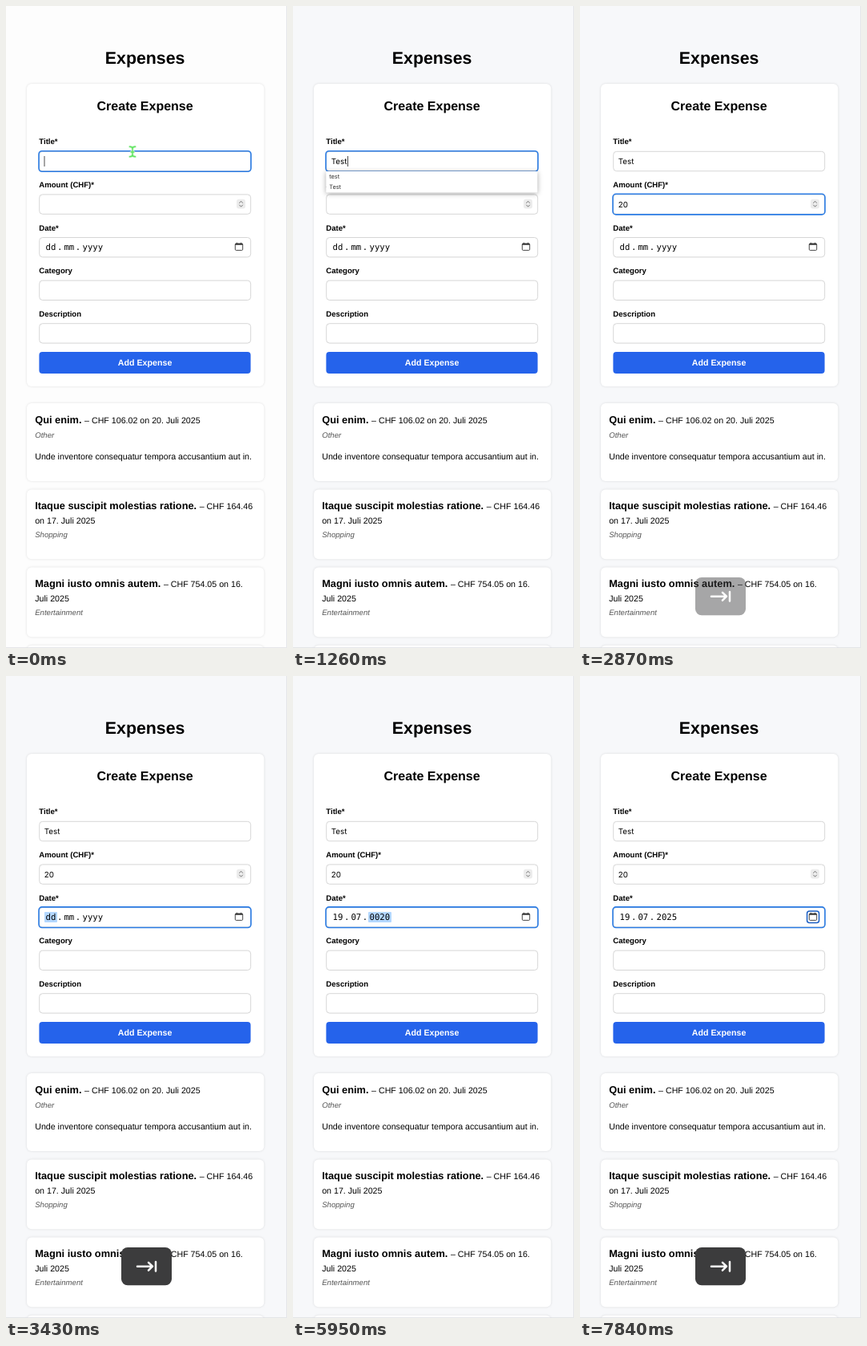
An HTML page for the animation above (8000 ms loop, 351 by 800 pixels).

```html
<!DOCTYPE html>
<html lang="en">
<head>
<meta charset="utf-8">
<title>Expenses</title>
<style>
  html, body { margin: 0; width: 100%; height: 100%; overflow: hidden; background: #f7f8fa; }
  svg { display: block; width: 100%; height: 100%; }
  text {
    font-family: "Liberation Sans", Arial, sans-serif; font-size: 10.67px; fill: #000;
    white-space: pre; text-rendering: geometricPrecision;
  }
  .h1 { font-size: 21.33px; font-weight: bold; text-anchor: middle; }
  .h2 { font-size: 16px; font-weight: bold; text-anchor: middle; }
  .label { font-size: 9.6px; font-weight: bold; }
  .name { font-size: 12.8px; font-weight: bold; }
  .tag { font-size: 9.6px; font-style: italic; fill: #555; }
  .btn { font-weight: bold; fill: #fff; text-anchor: middle; }
  .val { font-family: Inter, sans-serif; font-size: 9.8px; }
  .opt { font-family: Inter, sans-serif; font-size: 7.4px; fill: #333; }
  .mono { font-family: "DejaVu Sans Mono", monospace; }
  .card { fill: #fff; filter: drop-shadow(0 .8px 1.4px rgba(0, 0, 0, .12)); }
  .box { fill: #fff; stroke: #ccc; stroke-width: .8; }
  .menu { fill: #fff; filter: drop-shadow(0 1.5px 3px rgba(0, 0, 0, .35)); }
  .line { fill: none; stroke-linecap: round; stroke-linejoin: round; }
</style>
</head>
<body>
<svg id="stage" viewBox="0 0 351 800"></svg>
<script>
const stage = document.getElementById('stage');
const LOOP = 8000, STEP = 70;

function add(tag, attrs, parent = stage, text) {
  const el = document.createElementNS('http://www.w3.org/2000/svg', tag);
  for (const k in attrs) el.setAttribute(k, attrs[k]);
  if (text !== undefined) el.textContent = text;
  return parent.appendChild(el);
}
const group = (parent = stage) => add('g', {}, parent);
const rect = (x, y, width, height, rx, attrs, parent) =>
  add('rect', { x, y, width, height, rx, ...attrs }, parent);
const text = (x, y, cls, str, parent) => add('text', { x, y, class: cls }, parent, str);
const line = (d, stroke, width, parent) =>
  add('path', { d, class: 'line', stroke, 'stroke-width': width }, parent);
const show = (el, on) => el.setAttribute('visibility', on ? 'visible' : 'hidden');

// Latest value whose start time has passed.
const at = (keys, t) => keys.reduce((v, [start, next]) => (t >= start ? next : v), keys[0][1]);

// Page
const page = rect(0, 0, 351, 800, 0);
text(173.6, 71.6, 'h1', 'Expenses');
rect(26, 97, 296.3, 377, 6, { class: 'card' });
text(173.6, 129.7, 'h2', 'Create Expense');

const boxY = i => 181.3 + i * 53.6;
['Title*', 'Amount (CHF)*', 'Date*', 'Category', 'Description'].forEach((label, i) => {
  text(41.3, 172.3 + i * 53.65, 'label', label);
  rect(41.7, boxY(i), 264, 24.4, 4, { class: 'box' });
});
const ring = rect(41, 0, 265, 25.6, 4, { fill: 'none', stroke: '#2a7be4', 'stroke-width': 1.6 });

const title = text(47.8, 197.1, 'val', '');
const amount = text(47.8, 250.6, 'val', '');
const caret = rect(0, 0, .8, 13, 0, { fill: '#222' });

rect(288, 240.8, 11, 11.6, 3, { fill: '#ececec' });
line('M291.6 245.4l2-2.2l2 2.2M291.6 248l2 2.2l2-2.2', '#777', 1);

const mark = rect(0, 294, 16, 13, 1, { fill: '#b3d7ff' });
const date = [49.5, 72.4, 95.5].map(x => text(x, 304.2, 'mono', ''));
[63.9, 86.8].forEach(x => text(x, 304.2, 'mono', '.'));

const icon = group();
rect(286.3, 296, 9.4, 8.4, 1.2, { fill: 'none', stroke: '#333', 'stroke-width': .9 }, icon);
rect(286.3, 296, 9.4, 1.8, .5, { fill: '#333' }, icon);
line('M288.4 295.2v.8M293.6 295.2v.8', '#333', .9, icon);
const iconRing = rect(283.6, 293, 15, 14.6, 3, { fill: 'none', stroke: '#1b5fc4', 'stroke-width': 1.5 });

rect(41.4, 431, 264.2, 27, 4, { fill: '#2563eb' });
text(173.6, 448.1, 'btn', 'Add Expense');

// Expense list
function item(y, h, name, rest, wrapped, tag, note) {
  rect(26, y, 296.3, h, 6, { class: 'card' });
  const head = text(36.2, y + 24.7, '', undefined);
  add('tspan', { class: 'name' }, head, name + ' ');
  add('tspan', {}, head, rest);
  if (wrapped) text(36.2, y + 42.3, '', wrapped);
  text(36.2, y + (wrapped ? 59.6 : 43), 'tag', tag);
  if (note) text(36.2, y + 70.3, '', note);
}
item(495, 97, 'Qui enim.', '– CHF 106.02 on 20. Juli 2025', '', 'Other',
  'Unde inventore consequatur tempora accusantium aut in.');
item(602.6, 86.6, 'Itaque suscipit molestias ratione.', '– CHF 164.46', 'on 17. Juli 2025', 'Shopping');
item(699.6, 86.6, 'Magni iusto omnis autem.', '– CHF 754.05 on 16.', 'Juli 2025', 'Entertainment');
rect(26, 796.8, 296.3, 20, 6, { class: 'card' });
line('M350.6 0V799.6H0', '#dcdee1', .8);

// Suggestions
const menu = group();
rect(41.3, 206, 264, 26.6, 1, { class: 'menu' }, menu);
text(45.2, 214.9, 'opt', 'test', menu);
text(45.2, 228.4, 'opt', 'Test', menu);

// Text pointer
const pointer = group();
const beam = 'M154.5 175.2q3.5 0 3.5 2.5v7.6q0 2.5-3.5 2.5M161.5 175.2q-3.5 0-3.5 2.5v7.6q0 2.5 3.5 2.5M156.2 182h3.6';
line(beam, '#d5f7d5', 3, pointer);
line(beam, '#62e562', 1.4, pointer);

// Key badge
const badge = group();
rect(144, 712, 63, 47.3, 8, { fill: '#3c3c3d' }, badge);
const tabKey = line('M164 735.7h18M178 730.8l5 4.9l-5 4.9M187 730v11.6', '#fff', 2.5, badge);
const backKey = line('M171.5 726.2h14a2.5 2.5 0 0 1 2.5 2.5v14a2.5 2.5 0 0 1-2.5 2.5h-14l-8.5-9.5z' +
  'M173.8 732l7.4 7.4M181.2 732l-7.4 7.4', '#fff', 2.4, badge);

// Timeline
const titleKeys = [[0, ''], [770, 'T'], [910, 'Te'], [1050, 'Tes'], [1190, 'Test']];
const amountKeys = [[0, ''], [2100, '2'], [2170, '20']];
const dayKeys = [[0, 'dd'], [4410, '01'], [4620, '19']];
const monthKeys = [[0, 'mm'], [5180, '00'], [5530, '07']];
const yearKeys = [[0, 'yyyy'], [5880, '0002'], [5950, '0020'], [6090, '0202'], [6230, '2022'],
  [6860, 'yyyy'], [7140, '0002'], [7280, '0020'], [7350, '0202'], [7490, '2025']];
const focusKeys = [[0, 0], [1610, 1], [3150, 2]];
const partKeys = [[0, -1], [3150, 0], [4620, 1], [5600, 2], [7770, -1]];
const caretKeys = [[0, 1], [560, 0], [770, 1], [2660, 0]];
const caretX = [[0, 47.6], [770, 54.2], [910, 60], [1050, 65], [1190, 68], [1610, 47.6], [2100, 54], [2170, 60]];
const badges = [
  { from: 1470, to: 2030, dip: 1610 },
  { from: 2870, to: 4130, dip: 3150 },
  { from: 6720, to: 7070, dip: 6930, back: true },
  { from: 7700, to: 9000, dip: 9000 }
];

function drawBadge(t) {
  const b = badges.find(k => t >= k.from && t < k.to + STEP);
  show(badge, b);
  if (!b) return;
  const opacity = t >= b.to ? .45 : Math.min(1, .45 + (t - b.from) / STEP * .35);
  const scale = 1 - .11 * Math.max(0, 1 - Math.abs(t - b.dip) / 140);
  badge.setAttribute('opacity', opacity);
  badge.setAttribute('transform', `translate(175.5 735.7) scale(${scale}) translate(-175.5 -735.7)`);
  tabKey.setAttribute('display', b.back ? 'none' : 'inline');
  backKey.setAttribute('display', b.back ? 'inline' : 'none');
}

function draw(ms) {
  const t = Math.floor(ms / STEP + 1e-6) * STEP;
  const focus = at(focusKeys, t), part = at(partKeys, t);

  page.setAttribute('fill', at([[0, '#fdfdfd'], [70, '#fafbfc'], [140, '#f7f8fa']], t));
  title.textContent = at(titleKeys, t);
  amount.textContent = at(amountKeys, t);
  [dayKeys, monthKeys, yearKeys].forEach((keys, i) => { date[i].textContent = at(keys, t); });

  ring.setAttribute('y', boxY(focus) - .6);
  caret.setAttribute('x', at(caretX, t));
  caret.setAttribute('y', focus ? 240.4 : 187);
  show(caret, focus < 2 && at(caretKeys, t));

  show(mark, part >= 0);
  if (part >= 0) {
    mark.setAttribute('x', [48, 71, 94][part]);
    mark.setAttribute('width', part === 2 ? 29 : 16);
  }
  show(iconRing, t >= 7770);
  show(menu, t >= 840 && t < 1540);
  show(pointer, t < 770);
  drawBadge(t);
}

function tick() {
  draw(performance.now() % LOOP);
  requestAnimationFrame(tick);
}
tick();
</script>
</body>
</html>
```
